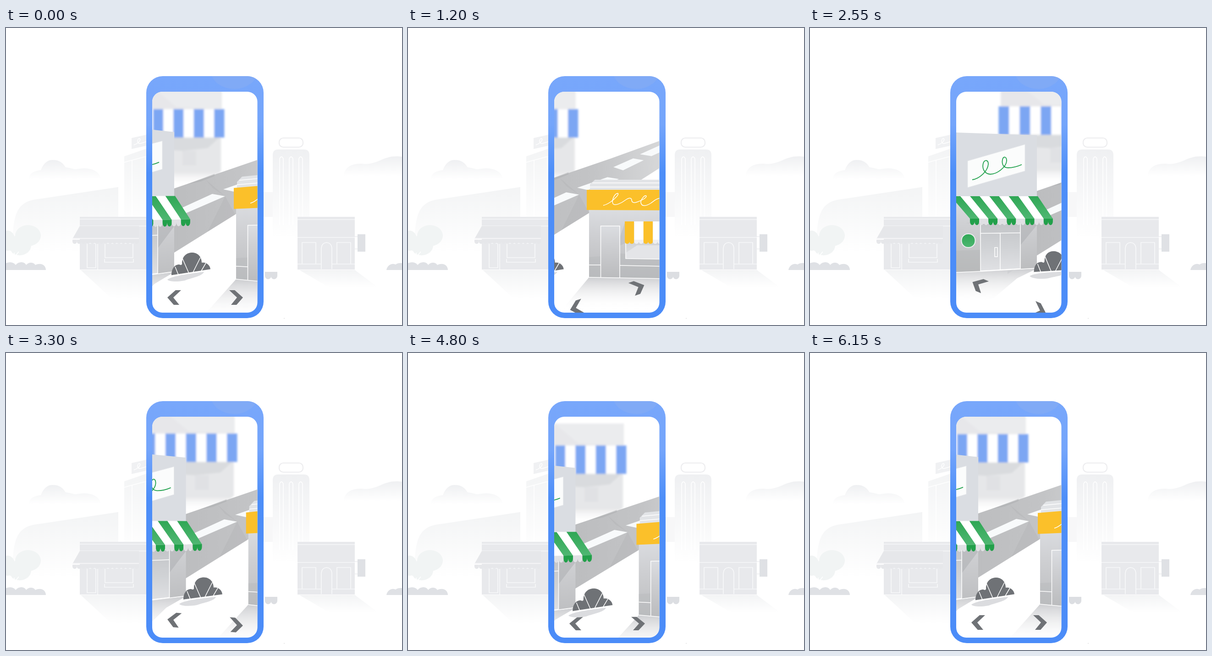
An HTML page for the animation above (6.45 s loop, 864 by 648 pixels).

```html
<!DOCTYPE html>
<html lang="en">
<head>
<meta charset="utf-8">
<title>Street view on a phone</title>
<style>
html, body { margin: 0; height: 100%; overflow: hidden; background: #fff }
svg { display: block; width: 864px; height: 648px }
.line { fill: none; stroke: #fff; stroke-width: 1.5 }
.faint { fill: none; stroke: #f8f9fa; stroke-width: 1.6 }
</style>
</head>
<body>
<svg viewBox="0 0 864 648">
<defs>
  <linearGradient id="body" x2="0" y2="1">
    <stop stop-color="#78a7fb"/><stop offset=".2" stop-color="#74a5fb"/>
    <stop offset=".4" stop-color="#4d8ef8"/><stop offset="1" stop-color="#4b8cf8"/>
  </linearGradient>
  <linearGradient id="mist" x2="0" y2="1">
    <stop stop-color="#eff0f2"/><stop offset="1" stop-color="#fff"/>
  </linearGradient>
  <linearGradient id="pale" x2="0" y2="1">
    <stop stop-color="#f3f4f5"/><stop offset="1" stop-color="#fff"/>
  </linearGradient>
  <linearGradient id="shade" x2="0" y2="1">
    <stop stop-color="#cdced1"/><stop offset=".9" stop-color="#fff" stop-opacity="0"/>
  </linearGradient>
  <linearGradient id="wall" x2="0" y2="1">
    <stop stop-color="#dbdde1"/><stop offset=".35" stop-color="#cfd0d3"/><stop offset="1" stop-color="#babbbd"/>
  </linearGradient>
  <linearGradient id="glass" x2="0" y2="1">
    <stop stop-color="#c3c5c8"/><stop offset=".5" stop-color="#d0d2d5"/><stop offset="1" stop-color="#e0e1e4"/>
  </linearGradient>
  <linearGradient id="tar">
    <stop stop-color="#b9babc"/><stop offset=".5" stop-color="#c3c4c6"/><stop offset="1" stop-color="#dfe0e1"/>
  </linearGradient>
  <linearGradient id="leaf" x2="0" y2="1">
    <stop stop-color="#2fa755"/><stop offset="1" stop-color="#4fb772"/>
  </linearGradient>
  <filter id="blur" x="-20%" y="-20%" width="140%" height="140%"><feGaussianBlur stdDeviation="2.3"/></filter>
  <clipPath id="screen"><rect x="319" y="139" width="229.500" height="482" rx="22"/></clipPath>
  <clipPath id="case"><rect x="306" y="105" width="256" height="528" rx="36"/></clipPath>
</defs>

<g id="town">
  <path fill="url(#mist)" d="M50,330C50,316 62,312 76,310C82,294 92,287 103,288C116,288 124,294 130,304C142,305 148,309 154,308C178,303 202,308 207,328Z"/>
  <path fill="url(#mist)" d="M736,323C740,301 756,296 776,296C800,300 816,287 832,283C844,279 856,280 864,281V323Z"/>
  <path fill="url(#pale)" d="M14,490C14,405 22,378 72,373L245,347V490Z"/>
  <path fill="#f0f1f3" d="M274,240L310,232V256L274,264Z"/>
  <path class="line" d="M279,255C289,252 296,243 291,241C286,242 285,253 293,252L306,248"/>
  <path fill="url(#pale)" d="M258,280L310,262V440H258Z"/>
  <path class="line" d="M258,293L306,280M275,288V412M304,281V412"/>
  <g fill="#f1f4f4">
    <ellipse cx="48" cy="453" rx="28" ry="23"/><ellipse cx="30" cy="474" rx="25" ry="22"/><ellipse cx="4" cy="464" rx="16" ry="22"/>
  </g>
  <path class="line" d="M18,512V490M10,486L18,500L28,488"/>
  <path fill="#dfe1e5" d="M0,528V513C10,509 18,512 21,517C27,509 40,509 44,517C50,510 60,511 64,517C76,511 87,517 87,528Z"/>
  <path fill="url(#pale)" d="M163,528H310V590H230Z"/>
  <path fill="#e8e9ec" d="M161,412H310V527H161Z"/>
  <path class="faint" d="M161,417H306M161,432H306M200,471V527M177,523V470H196V523ZM216,470H277V501H216ZM215,504V511H278V504"/>
  <path fill="#e6e7ea" d="M161,432H290V460H145Z"/>
  <path class="faint" d="M145,459H290"/>
  <path fill="#f7f7f8" d="M560,358H584V412H560Z"/>
  <rect x="596" y="240" width="52" height="20" rx="9" fill="none" stroke="#ededef" stroke-width="2.200"/>
  <path fill="url(#mist)" d="M582,460V277Q582,265 594,265H650Q662,265 662,277V460Z"/>
  <path class="line" d="M597,430V285Q601,277 605,285V430M618,430V285Q622,277 626,285V430M639,430V285Q643,277 647,285V430"/>
  <path fill="url(#pale)" d="M640,528H761L812,566H705Z"/>
  <path fill="#e8e9ec" d="M636,412H761V527H636Z"/>
  <path fill="#dfe1e5" d="M767,450H784V488H767Z"/>
  <path class="faint" d="M636,418H761M636,457H761M636,515H688M711,515H761M646,514V468H676V514M722,514V468H752V514M688,526V480Q689,469 699.500,468Q710,469 711,480V526"/>
  <path fill="none" stroke="#e4e5e9" d="M761,455H767M761,482H767"/>
  <path fill="#dfe1e5" d="M830,528C832,517 842,512 850,516Q856,512 864,513V528Z"/>
  <path fill="#dcdee2" d="M565,532H592V541C591,550 580,550 578.500,543C576,550 566,550 565,541Z"/>
  <circle cx="607" cy="633.500" r=".8" fill="#ccc"/>
</g>

<rect x="306" y="105" width="256" height="528" rx="36" fill="url(#body)"/>
<ellipse cx="498" cy="93" rx="51" ry="40" fill="#80aaf6" clip-path="url(#case)"/>
<rect x="319" y="139" width="229.500" height="482" rx="22" fill="#fff"/>

<g clip-path="url(#screen)">
  <g id="far" filter="url(#blur)">
    <path fill="url(#shade)" opacity=".7" d="M281,308L469,308L450,350L281,350Z"/>
    <path fill="#ebecee" d="M281,129L471,129L471,180L281,180Z"/>
    <path fill="#e3e4e7" d="M320,129L372,172L471,177L281,177L281,129Z" opacity=".5"/>
    <path fill="#e6e7e9" d="M281,236L469,236L469,314L281,314Z"/>
    <path fill="#d9dbde" d="M281,236L469,236L440,262L385,268L281,262Z"/>
    <path fill="#e0e1e4" d="M385,268L415,268L415,300L385,300Z"/>
  </g>
  <g id="road">
    <path fill="url(#tar)" d="M300,374L367,350L548,288L720,226L720,275L654,309L500,407L367,490L300,532Z"/>
    <path fill="#a9abad" opacity=".45" d="M395,341L455,318L455,323L425,335Z"/>
    <path fill="#aeb0b2" opacity=".35" d="M452,350L478,367L500,407L440,444L470,384L478,367L435,330Z"/>
    <path fill="#f8fafb" d="M300,428L367,400L450,362L478,367L388,406L367,418L300,448Z"/>
    <path fill="#f8fafb" d="M474,352L540,329L565,333L497,357Z"/>
    <path fill="#f8fafb" d="M553,307L596,288L619,292L574,314Z"/>
    <path fill="#f8fafb" d="M611,279L660,257L690,259L636,283Z"/>
  </g>
  <g id="green">
    <path fill="url(#shade)" d="M260,534L495,525L452,546L400,590L260,610Z"/>
    <path fill="#dadde2" d="M260,226L495,234L495,370L260,370Z"/>
    <path fill="url(#wall)" d="M260,368L495,368L495,524L372,531L260,536Z"/>
    <path fill="#b3b5b7" opacity=".45" d="M260,487L372,484L372,531L260,536Z"/>
    <path fill="#aeb0b3" opacity=".55" d="M340,425L495,425L495,430L459,474L459,440L372,440L372,428Z"/>
    <path fill="url(#glass)" stroke="#fff" stroke-width="1.500" d="M372,426L459,426L459,525L372,530Z"/>
    <path class="line" d="M372,448L459,447M415,448L415,527M403,479L409,479L409,499L403,499ZM260,536L372,531L495,524"/>
    <path fill="url(#leaf)" stroke="#eceef0" stroke-width="2" d="M330.500,464C330.500,444 360.500,444 360.500,464C360.500,484 330.500,484 330.500,464Z"/>
    <path fill="#fbfcfc" stroke="#e6e8eb" stroke-linejoin="round" d="M344,290L469,254L469,312L344,348Z"/>
    <path fill="none" stroke="#1fa04b" stroke-width="1.800" d="M354,331C370,329 388,312 389,297C389,287 381,287 378,295C375,306 380,318 393,319C409,319 428,303 429,290C429,280 422,279 420,287C418,297 422,305 432,305C443,305 453,302 462,298"/>
  </g>
  <g id="yellow">
    <path fill="url(#shade)" d="M395,544L620,548L620,610L330,622Z"/>
    <path fill="#e2e4e7" d="M397,355L397,341L408,331L620,331L620,355Z"/>
    <path class="line" d="M402,338L620,338M397,347L620,347"/>
    <path fill="url(#wall)" d="M395,395L620,395L620,548L395,544Z"/>
    <path fill="#b4b6b8" opacity=".4" d="M395,500L420,498L462,492L620,500L620,548L395,544Z"/>
    <path fill="#b4b6b8" opacity=".45" d="M473,425L473,470L455,478Z"/>
    <path fill="url(#wall)" stroke="#fff" stroke-width="1.500" d="M420.500,544L420.500,432L462,432L462,545"/>
    <path class="line" d="M395,517L420,517M462,518L620,521M395,544L620,548"/>
    <path fill="url(#glass)" stroke="#fff" stroke-width="1.500" d="M475,423L596,423L596,505L475,503Z"/>
    <path fill="#e4e5e8" d="M476,490L500,474L595,474L595,504L476,502Z"/>
    <path fill="#fbc02a" d="M390,353L620,353L620,398L390,397Z"/>
    <path class="line" d="M426,387C436,385 448,376 455,368C460,362 459,360 456,361C450,363 444,376 447,383C451,390 467,381 475,375C482,370 487,370 488,375C488,381 493,382 499,380C508,377 520,371 520,367C519,362 508,372 508,381C510,391 521,388 530,382C538,376 543,372 550,371L590,376"/>
  </g>
  <g id="arrows" fill="#6f7276">
    <path d="M352,588L370,572H382L365,588L378,604H366Z"/>
    <path d="M517,588L499,572H487L504,588L491,604H503Z"/>
  </g>
  <g id="bush">
    <path fill="#dbdcdf" d="M352,549C362,541 400,536 432,532C428,542 404,545 390,551C376,554 356,554 352,549Z"/>
    <path fill="#6f7276" d="M361,540C361,526 367,516 378,516C382,518 384,517 384,514C384,499 393,490 406,490C419,490 427,500 427,512C437,510 446,518 446,527Z"/>
    <path class="line" d="M361,540L446,527M376,538L369,521M399,535L385,503M408,533L424,501M426,530L436,513"/>
  </g>
</g>
</svg>
<script>
const $ = id => document.getElementById(id);

const add = (group, fill, d) =>
  $(group).insertAdjacentHTML('beforeend', `<path fill="${fill}" d="${d}"/>`);

// Striped cloth from a top edge to a bottom edge, each stripe ending in round lobes.
function awning(group, n, tx, tw, ty, bx, bw, by, drop, lobes, fills, lips) {
  for (let i = 0; i < n; i++) {
    const a = tx + i * tw, b = bx + i * bw, w = bw / lobes, y = by + drop * .4, low = by + drop * 1.2;
    let lip = `M${b},${y}L${b},${by}L${b + bw},${by}L${b + bw},${y}`;
    for (let x = b + bw, j = 0; j < lobes; j++, x -= w) lip += `C${x},${low} ${x - w},${low} ${x - w},${y}`;
    add(group, lips[i % 2], lip + 'Z');
    add(group, fills[i % 2], `M${a},${ty}L${a + tw},${ty}L${b + bw},${by}L${b},${by}Z`);
  }
}
awning('town', 15, 145, 9.67, 460, 145, 9.67, 462, 9, 1, ['none', 'none'], ['#e6e7ea', '#e6e7ea']);
awning('green', 9, 307, 21.1, 367, 349, 20.1, 416, 14, 2, ['url(#leaf)', '#fff'], ['#22a04a', '#e0e1e4']);
awning('yellow', 6, 473, 20.4, 422, 473, 20.4, 462, 9, 2, ['#fbc02a', '#fff'], ['#fbc02a', '#f0f0f2']);
for (let i = 0; i < 9; i++) {
  const x = 276.5 + i * 22.2;
  add('far', i % 2 ? '#fff' : '#7ba6f3', `M${x},177L${x + 22.2},177L${x + 22.2},239L${x},239Z`);
}

const clamp = (v, lo, hi) => Math.min(hi, Math.max(lo, v));
const lerpKeys = (keys, n) => {
  const i = keys.findIndex(k => k[0] >= n);
  if (i < 0) return 0;
  if (!i) return keys[0][1];
  const [a, u] = keys[i - 1], [b, v] = keys[i];
  return u + (v - u) * (n - a) / (b - a);
};
// Keys are [tick, value]; pan is -1 (right) to 1 (left), tilt is in pixels.
const panKeys = [[1, 0], [6, -1], [7, -1], [17, 1], [18, 1], [23, 0]];
const tiltKeys = [[24, 0], [28, 94], [29, 94], [36, -70], [37, -70], [41, 0]];
const TICK = 150, TICKS = 43;

let pan = 0, tilt = 0;
const left = () => Math.max(0, pan);
const wide = x => 434 + (x - 434) * (1 + tilt * .001);
const extra = () => clamp(tilt - 22, 0, 40) * .62;

// Each layer bends its own points as the view turns.
const layers = {
  far: (x, y) => [x + 133 * pan + 2 * pan * pan + left() * (x - 276) * .035, y + tilt + extra() - 6 * left()],
  road: (x, y) => [wide(x + 131 * pan), y + 4.5 * pan + tilt + extra() * .6 * clamp((490 - y) / 200, 0, 1)],
  green: (x, y) => {
    const grow = 1 + (1 - pan) * (.05 + (495 - x) * .0005);
    return [wide(x + 128 * (pan - 1)), 375 + (y - 375) * grow + tilt];
  },
  yellow: (x, y) => {
    const grow = 1 + Math.max(0, 1 + pan / .8) * (.04 + (x - 390) * .0008);
    return [wide(x + 107 + 133.75 * pan), 455 + (y - 455) * grow + tilt];
  },
  bush: (x, y) => [wide(x + 130.5 * pan - 3 * pan * pan), y + tilt + left() * ((x - 361) * .09 - 7)]
};
const shapes = Object.entries(layers).flatMap(([id, map]) =>
  [...$(id).querySelectorAll('path')].map(el => ({ el, map, d: el.getAttribute('d') })));

let shown = -1;
function draw(now) {
  const tick = Math.floor(now / TICK) % TICKS;
  if (tick !== shown) {
    shown = tick;
    pan = lerpKeys(panKeys, tick);
    tilt = lerpKeys(tiltKeys, tick);
    for (const { el, map, d } of shapes)
      el.setAttribute('d', d.replace(/([\d.]+),([\d.]+)/g, (_, x, y) => map(+x, +y).map(v => v.toFixed(2)).join()));
    const turn = .41 * pan, bend = pan * pan;
    $('arrows').setAttribute('transform',
      `translate(434.5 ${588 + tilt * .1}) scale(1 ${1 - tilt * .0034})
       matrix(${1 - .03 * bend} ${turn} ${-turn} ${1 - .14 * bend} 0 0) translate(-434.5 -588)`);
  }
  requestAnimationFrame(draw);
}
requestAnimationFrame(draw);
</script>
</body>
</html>
```
